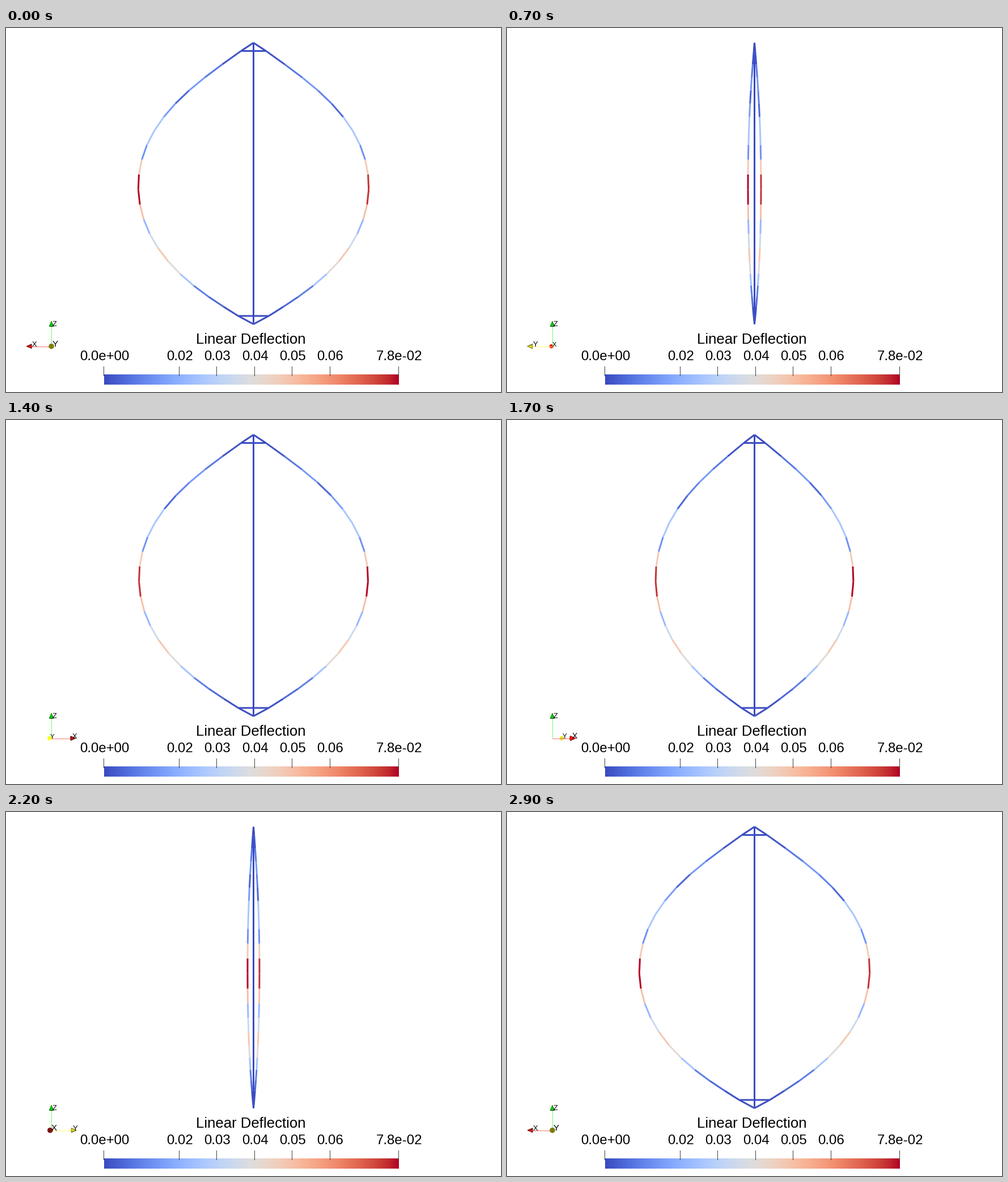
Recreate the animation shown at these times as a matplotlib script. Size 873 px wide and 641 px high, loop 3000 ms.

```python
import numpy as np
import matplotlib.pyplot as plt
from matplotlib.animation import FuncAnimation
from matplotlib.collections import LineCollection, PolyCollection
from numpy.polynomial import Polynomial

W, H, DPI = 873, 641, 64
PX = 72 / DPI            # points per pixel
FRAMES, INTERVAL = 30, 100
FONT = "Liberation Sans"
CMAP = plt.get_cmap("coolwarm")

# Rotor: blade nodes run smoothly between the struts at t = -1 and t = 1
CX, APEX, FOOT = 436.5, 26, 521.5
T = np.linspace(-1, 1, 21)
BOW = Polynomial([203.2, -8.5, -197.9, 0, 7.9, 11, 11.3])
DROP = Polynomial([284.5, 265, 0, -47, -10.75, 15.3])
RADIUS = np.concatenate([[0], BOW(T), [0]])
HEIGHT = np.concatenate([[APEX], DROP(T), [FOOT]])
SWEEP = 0.5              # small out-of-plane bend of the blades

# Orientation axes
ORIGIN = np.array([80, 560.5])
CAMERA = 260
TIP, BASE, CONE_R, LABEL_R = 44, 35, 4, 36
SIDES = 16
AXIS_RGB = {"X": (1, 0, 0), "Y": (1, 1, 0), "Z": (0, 1, 0)}


def element_values(dip, peak):
    """Relative deflection of each blade element, between key elements."""
    keys = [(0, 0), (1, .02), (3, .19), (dip, .06), (6, .33), (7, .33), (8, .17),
            (9, .6), (10, peak), (11, peak), (12, .64), (13, .28), (15, .61),
            (16, .52), (18, .12), (20, .01)]
    return np.interp(np.arange(len(RADIUS) - 1), *zip(*keys))


def label(x, y, text, size, ha="center"):
    return ax.text(x, y, text, fontsize=size * PX, family=FONT, color="black",
                   ha=ha, va="baseline", zorder=5)


def draw_legend():
    x0, x1, top, bottom = 173, 693, 610.5, 628.5
    ax.imshow(np.linspace(0, 1, x1 - x0)[None], cmap=CMAP, aspect="auto",
              extent=(x0, x1, bottom, top), interpolation="nearest")
    label(431.8, 556, "Linear Deflection", 25.7)
    ticks = [(0, "0.0e+00")]
    ticks += [(v / 100, f"{v / 100:.2f}") for v in range(2, 7)]
    ticks += [(0.0783, "7.8e-02")]
    for value, text in ticks:
        x = x0 + (x1 - x0) * value / 0.0783
        ax.plot([x - .8, x - .8], [596, 612], color="0.25", lw=PX, zorder=3)
        label(x + .4, 585.3, text, 24)


def project(p):
    scale = CAMERA / (CAMERA - p[2])
    return ORIGIN + scale * np.array([p[0], -p[1]])


def cone(direction, rgb):
    """Visible facets of an arrow head with their shaded colours."""
    side = np.array([0, 0, 1.]) if direction[1] else np.array([0, 1., 0])
    other = np.cross(direction, side)
    slope = np.arctan2(CONE_R, TIP - BASE)
    tip, base = TIP * direction, BASE * direction

    def radial(k):
        a = 2 * np.pi * k / SIDES
        return np.cos(a) * side + np.sin(a) * other

    rim = [base + CONE_R * radial(k) for k in range(SIDES)]
    faces = [(rim, -direction)]
    for k in range(SIDES):
        normal = np.cos(slope) * radial(k + .5) + np.sin(slope) * direction
        faces.append(([tip, rim[k], rim[(k + 1) % SIDES]], normal))

    polys, colors = [], []
    for points, normal in faces:
        view = np.array([0, 0, CAMERA]) - points[0]
        light = normal @ view / np.linalg.norm(view)
        if light > 0:
            polys.append([project(p) for p in points])
            colors.append(tuple(min(1, .1 + .9 * light) * c for c in rgb))
    return polys, colors


fig = plt.figure(figsize=(W / DPI, H / DPI), dpi=DPI, facecolor="white")
ax = fig.add_axes([0, 0, 1, 1])
draw_legend()
ax.set_xlim(0, W)
ax.set_ylim(H, 0)
ax.axis("off")

rotor = LineCollection([], linewidths=3 * PX, capstyle="butt", zorder=2)
rotor.set_snap(False)
values = np.concatenate([np.zeros(3), element_values(4, 1), element_values(5, .95)])
rotor.set_color(CMAP(values))
ax.add_collection(rotor, autolim=False)
triad = PolyCollection([], zorder=4)
ax.add_collection(triad, autolim=False)
names = {n: label(0, 0, n, 13, "left") for n in AXIS_RGB}


def draw_rotor(c, s):
    offset = RADIUS * c + SWEEP * RADIUS / RADIUS.max() * s
    lines = [[(CX, APEX), (CX, FOOT)]]
    for k in (1, -2):
        lines.append([(CX - offset[k], HEIGHT[k]), (CX + offset[k], HEIGHT[k])])
    for sign in (-1, 1):
        nodes = np.column_stack([CX + sign * offset, HEIGHT])
        lines += [nodes[k:k + 2] for k in range(len(nodes) - 1)]
    rotor.set_segments(lines)


def draw_triad(c, s):
    axes = {"X": np.array([-c, 0, -s]), "Y": np.array([-s, 0, c]),
            "Z": np.array([0, 1., 0])}
    polys, colors, widths = [], [], []
    for name, d in sorted(axes.items(), key=lambda item: item[1][2]):
        rgb = AXIS_RGB[name]
        pale = tuple(.45 + .55 * v for v in rgb)
        shaft = ([[project(0 * d), project(BASE * d)]], [pale], PX)
        head = (*cone(d, rgb), .3)
        for shapes, tints, width in ((shaft, head) if d[2] >= 0 else (head, shaft)):
            polys += shapes
            colors += tints
            widths += [width] * len(shapes)
        anchor = LABEL_R * d
        x, y = project(anchor)
        names[name].set_position((x + 1.6, y + .4))
        names[name].set_fontsize(13 * PX * CAMERA / (CAMERA - anchor[2]))
    triad.set_verts(polys)
    triad.set_facecolor(colors)
    triad.set_edgecolor(colors)
    triad.set_linewidth(widths)


def update(i):
    # First and last pose coincide after one full turn
    angle = 2 * np.pi * i / (FRAMES - 1)
    c, s = np.cos(angle), np.sin(angle)
    draw_rotor(c, s)
    draw_triad(c, s)
    return [rotor, triad, *names.values()]


anim = FuncAnimation(fig, update, frames=FRAMES, interval=INTERVAL,
                     init_func=lambda: update(0), repeat=True, repeat_delay=0)
plt.show()
```
